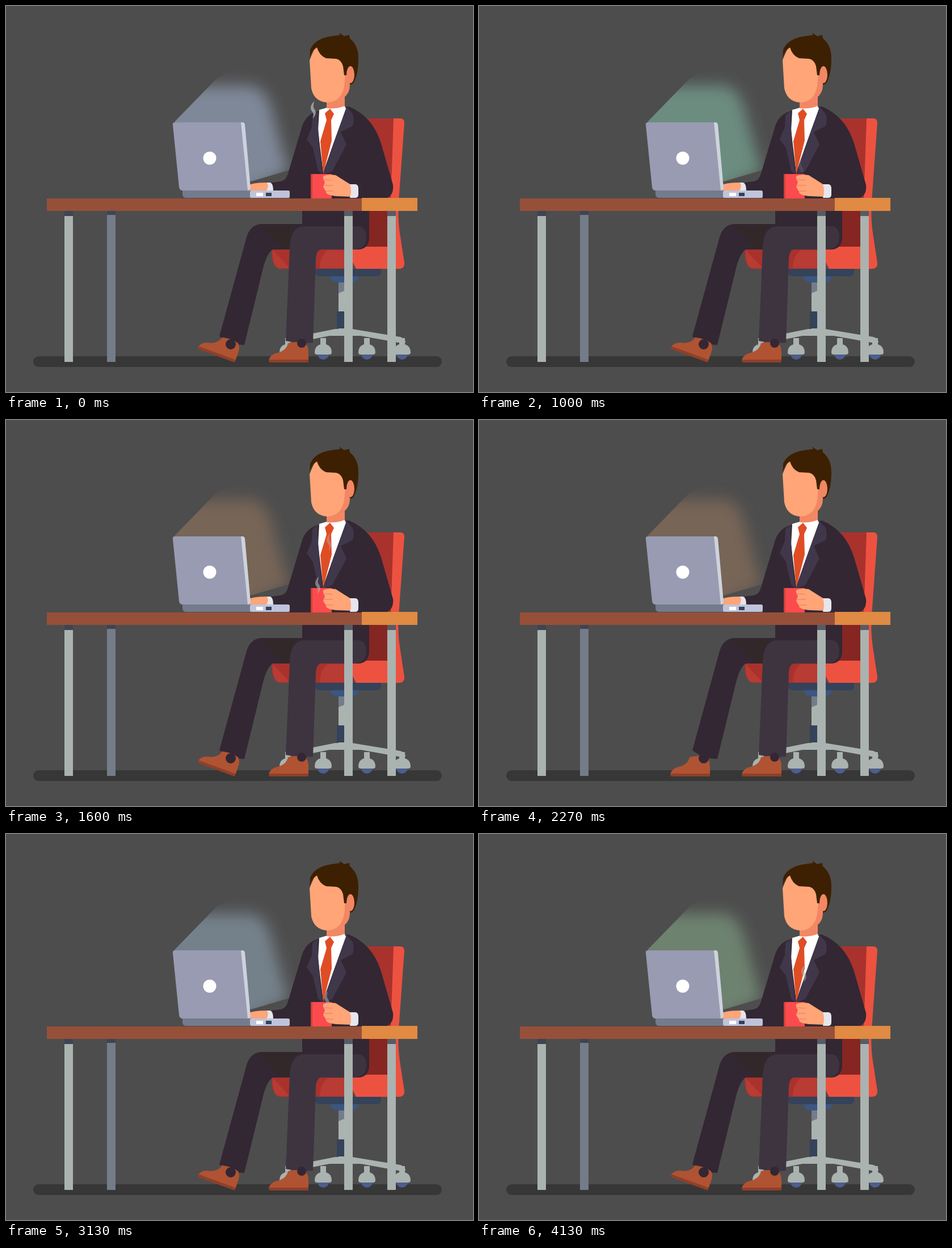
An HTML page for the animation above (4200 ms loop, 823 by 680 pixels).

```html
<!DOCTYPE html>
<html lang="en">
<head>
<meta charset="utf-8">
<title>Man at a desk</title>
<style>
html, body { margin: 0; width: 100%; height: 100%; overflow: hidden; background: #4d4d4d; }
svg { display: block; width: 823px; height: 680px; }
.suit { fill: #332733; }
.metal { fill: #aab3b0; }
.navy { fill: #34425a; }
.red { fill: #ed5240; }
.wine { fill: #a9322d; }
.skin { fill: #ffa578; }
.shade { fill: #f28764; }
</style>
</head>
<body>
<svg viewBox="0 0 823 680">
  <defs>
    <filter id="soft" x="-30%" y="-30%" width="160%" height="160%"><feGaussianBlur stdDeviation="13"/></filter>
    <clipPath id="beam"><path d="M297 204L372 127L430 95L540 60V277L432 309Z"/></clipPath>
    <g id="shoe">
      <path fill="#b05332" d="M497 594Q495 605 482 610Q465 613 463 625H533V610Q533 599 527 594Q512 590 497 594Z"/>
      <path fill="#8e4029" d="M463 623H533V628H466Q463 628 463 623Z"/>
    </g>
    <g id="caster">
      <circle cy="613" r="10" fill="#4d5d8e"/>
      <path class="metal" d="M-5 585H5V596Q15 599 15 610Q15 614 11 614H-11Q-15 614 -15 610Q-15 599 -5 596Z"/>
    </g>
    <path id="wisp" d="M2 -15C-8 -5 -3 1 0 5C2 9 0 12 0 15C6 8 6 3 2 -2C-1 -7 2 -11 2 -15Z"/>
  </defs>

  <rect x="48" y="617" width="720" height="19" rx="9.5" fill="#373737"/>
  <g clip-path="url(#beam)"><path id="glow" filter="url(#soft)" d="M225 240L300 140H432Q460 145 470 190L490 265L500 290L400 340Z"/></g>

  <!-- chair -->
  <path class="wine" d="M630 198H690L680 345H640Z"/>
  <path fill="#852622" d="M630 345H680V430H630Z"/>
  <path class="wine" d="M468 429H612V463H482Q468 461 468 429Z"/>
  <path fill="#b83b34" d="M470 430L500 462H482Q469 460 470 430ZM568 430H597V462H553Q553 440 568 430Z"/>
  <path class="red" d="M683 198H695Q702 198 702 206L692 345Q690 370 694 400L702 452Q703 463 692 463H617L597 424H672V345H678Z"/>
  <path class="navy" d="M545 463H661V469Q661 476 653 476H553Q545 476 545 469Z"/>
  <path fill="#3b5680" d="M571 476H622Q620 487 606 487H587Q573 487 571 476Z"/>
  <path fill="#747c8a" d="M586 487H598V508H586Z"/>
  <path class="metal" d="M586 506L598 501V570H586Z"/>
  <path class="navy" d="M583 538H596V568H583Z"/>
  <path class="metal" d="M535 578L580 569H610L695 583Q704 586 704 593H692L625 581H570L535 588Z"/>
  <use href="#caster" x="497"/><use href="#caster" x="559"/><use href="#caster" x="636"/><use href="#caster" x="698"/>

  <!-- legs -->
  <path class="suit" d="M522 339H640V410Q638 429 620 429H470Q460 435 453 462L420 597Q395 597 376 582L424 407Q431 384 452 384H522Z"/>
  <path fill="#322829" d="M446 386H515Q502 394 500 429H488Z"/>
  <path fill="#3d3440" d="M525 388H622Q635 390 635 407Q635 428 613 429H555Q547 430 546 445L541 593Q515 595 493 590L500 425Q502 389 525 388Z"/>
  <g id="foot"><use href="#shoe" x="-126"/></g>
  <circle class="suit" cx="396" cy="596" r="9"/>
  <use href="#shoe"/>
  <circle class="suit" cx="521" cy="594" r="8"/>

  <!-- jacket and shirt -->
  <path class="suit" d="M549 185Q527 192 521 215L497 295Q494 307 484 309L468 311V326H500V339H668Q684 335 682 315L661 242Q646 194 604 177Z"/>
  <path fill="#fff" d="M552 183L566 179L596 175L600 182L577 243L559 293L550 220Z"/>
  <path fill="#40374a" d="M549 185L540 192L539 213L530 235L541 250L550 290L557 296L550 215ZM600 178L611 190Q615 205 610 212L590 222L600 244L575 291L558 297L577 242Z"/>
  <path fill="#e04d24" d="M562 189L571 181L578 190L573 201L574 237L559 296L554 238L565 201Z"/>

  <!-- head -->
  <path class="shade" d="M565 160L597 150V176Q582 182 565 180Z"/>
  <path class="shade" d="M590 110H606V140Q605 168 566 170Z"/>
  <path class="skin" d="M546 70L600 85L597 132Q595 168 567 170Q543 169 538 145L535 95Z"/>
  <path fill="#3d2002" d="M535 98L536 77Q544 57 575 53L589 51L587 47L596 53L605 51L606 57Q621 69 621 92Q621 121 612 136L607 139L600 122H596L594 106Q591 95 582 93L564 92Q552 87 548 73Q536 80 535 98Z"/>
  <ellipse class="shade" cx="607" cy="121" rx="7" ry="15"/>

  <!-- laptop -->
  <path class="skin" d="M429 325V315Q438 311 462 311V325Z"/>
  <path fill="#e6e6ec" d="M460 311H465Q471 312 471 325H459Q464 318 460 311Z"/>
  <path fill="#747b8c" d="M311 325H432V338H317Q311 338 311 330Z"/>
  <rect x="430" y="325" width="70" height="13" rx="3" fill="#bfc3dc"/>
  <path fill="#fff" d="M441 329H453V335H441Z"/>
  <path class="navy" d="M458 329H468V335H458Z"/>
  <path fill="#989bb2" d="M294 210Q293 205 298 205H417L428 325H311Q306 325 305 319Z"/>
  <path fill="#ced2dc" d="M414 205H417Q420 205 421 209L431 320Q431 325 426 325Z"/>
  <circle cx="359" cy="268" r="11.5" fill="#fff"/>

  <!-- mug and hand -->
  <path fill="#fb4b4e" d="M537 296H574V339H537Z"/>
  <path fill="#cf4039" d="M537 296H540V339H537Z"/>
  <path class="skin" d="M559 300Q566 296 581 298L600 310L608 315V336L582 335Q563 333 564 327L559 319L562 310Q558 305 559 300Z"/>
  <path fill="none" stroke="#f28764" stroke-width="1.5" d="M561 306L575 307M561 316H576M564 326H577"/>
  <path fill="#e6e6ec" d="M606 314H616Q621 315 621 321V332Q621 338 615 338H606Q610 326 606 314Z"/>
  <g id="steam" fill="#b3b6b8"></g>

  <!-- desk -->
  <path fill="#96503a" d="M72 339H628V361H72Z"/>
  <path fill="#e08a43" d="M627 338H725V361H627Z"/>
  <path fill="#747c8a" d="M178 367H193V627H178Z"/>
  <path class="metal" d="M103 370H118V627H103ZM596 370H611V627H596ZM672 370H687V627H672Z"/>
  <path fill="#3d4454" d="M103 361H118V370H103ZM178 361H193V368H178Z"/>
  <path fill="#575b65" d="M596 361H611V370H596ZM672 361H687V370H672Z"/>
</svg>
<script>
const LOOP = 4200, TAP = 525;
const byId = id => document.getElementById(id);
const foot = byId('foot'), glow = byId('glow'), steam = byId('steam');

// time, red, green, blue; the loop ends on a hard cut
const light = [
  [0, 127, 136, 152], [530, 109, 128, 112], [1000, 108, 140, 128],
  [1600, 119, 101, 87], [2270, 119, 101, 87], [3130, 117, 129, 138], [4130, 110, 130, 112]
];
// time, x, y, opacity
const wisps = [
  [[0, 541, 183, .75], [530, 540, 167, .08], [700, 540, 160, 0]],
  [[900, 567, 297, 0], [1000, 567, 285, .15], [1600, 569, 215, .4], [1900, 570, 185, 0]],
  [[1400, 550, 302, 0], [1600, 549, 291, .6], [2200, 545, 220, 0]],
  [[2950, 564, 302, 0], [3130, 565, 292, .5], [4130, 572, 246, .5]]
].map(keys => {
  const el = document.createElementNS('http://www.w3.org/2000/svg', 'use');
  el.setAttribute('href', '#wisp');
  steam.append(el);
  return { el, keys };
});

function sample(keys, t) {
  const next = keys.findIndex(k => k[0] > t);
  if (next < 0) return keys[keys.length - 1].slice(1);
  if (next === 0) return keys[0].slice(1);
  const a = keys[next - 1], b = keys[next];
  const p = (t - a[0]) / (b[0] - a[0]);
  return a.slice(1).map((v, i) => v + (b[i + 1] - v) * p);
}

function draw(now) {
  const t = now % LOOP;
  const lift = Math.min(1, Math.max(0, .5 + 1.2 * Math.cos(t / TAP * 2 * Math.PI)));
  foot.setAttribute('transform', `translate(${-4 * lift} 0) rotate(${20 * lift} 407 628)`);
  glow.setAttribute('fill', `rgb(${sample(light, t).map(Math.round)})`);
  for (const { el, keys } of wisps) {
    const [x, y, alpha] = sample(keys, t);
    el.setAttribute('transform', `translate(${x} ${y})`);
    el.setAttribute('opacity', alpha);
  }
}

const start = performance.now();
function tick() {
  draw(performance.now() - start);
  requestAnimationFrame(tick);
}
tick();
</script>
</body>
</html>
```
